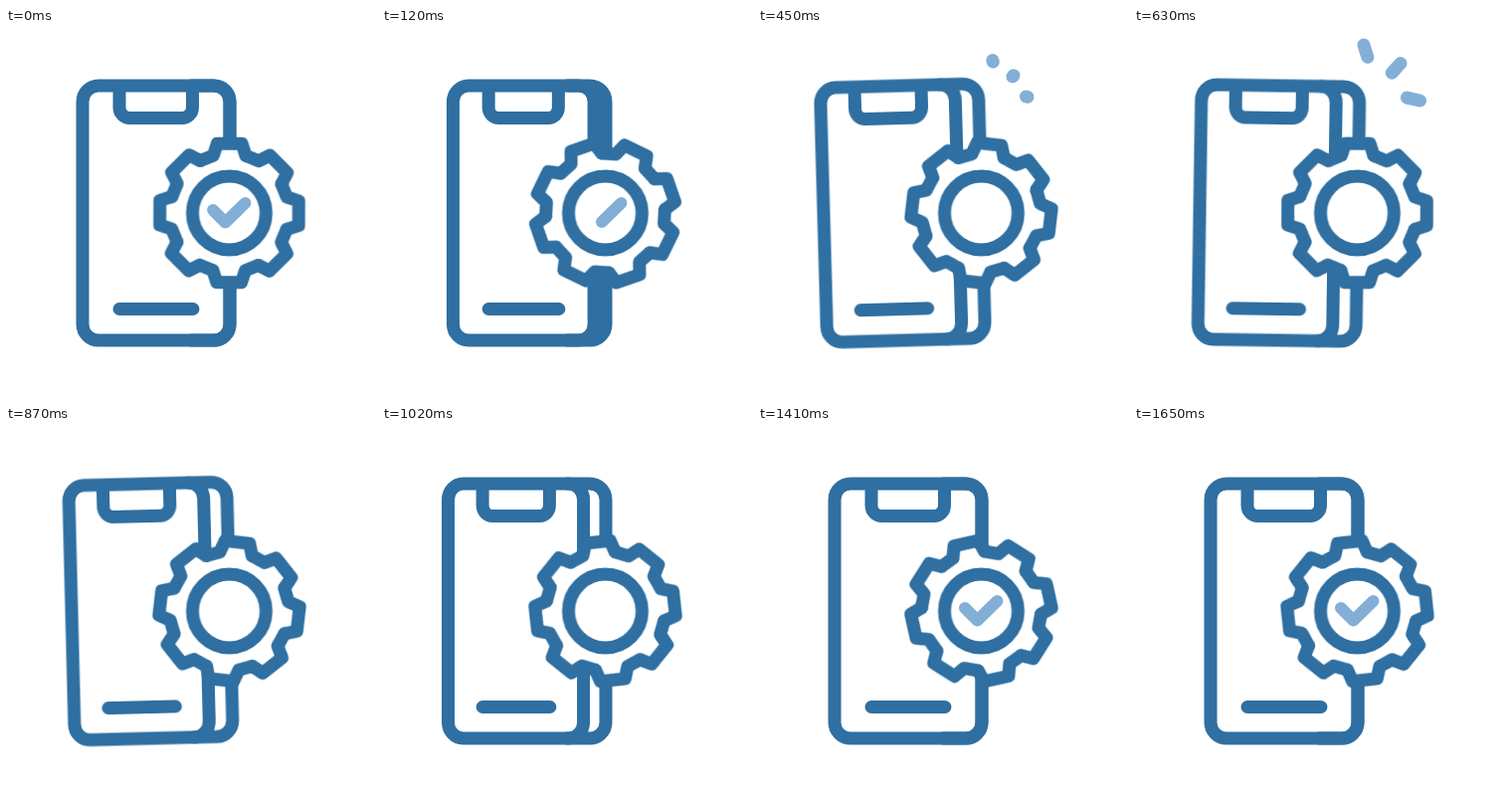
Recreate the animation shown at these times as an HTML page without scripts. Size 372x372 px, loop 1.68 s.

```html
<!DOCTYPE html>
<html lang="en">
<head>
<meta charset="utf-8">
<title>Phone setup complete</title>
<style>
  html, body { margin: 0; width: 100%; height: 100%; overflow: hidden; background: #fff; }
  svg { display: block; width: 100vw; height: 100vh; }

  :root {
    --loop: 1680ms;
    --dark: #2f6fa1;
    --light: #83afd6;
    --flat: path("M93 58H209A16 16 0 0 1 225 74V298A16 16 0 0 1 209 314H93A16 16 0 0 1 77 298V74A16 16 0 0 1 93 58Z M114 58V80A10.5 10.5 0 0 0 124.5 90.5H177A10.5 10.5 0 0 0 187.5 80V58 M114 282.5H188");
    --turned: path("M81 58H186.5A15 16 0 0 1 201.5 74V298A15 16 0 0 1 186.5 314H81A15 16 0 0 1 66 298V74A15 16 0 0 1 81 58Z M100.5 58V80A10 10.5 0 0 0 110.5 90.5H157.5A10 10.5 0 0 0 167.5 80V58 M100.5 282.5H168");
  }

  .dark, .light { fill: none; stroke-width: 13; stroke-linecap: round; stroke-linejoin: round; }
  .dark { stroke: var(--dark); }
  .light { stroke: var(--light); stroke-dasharray: 1 2; }

  .phone { transform-origin: 146px 186px; animation: shake var(--loop) ease-in-out infinite; }
  .face { d: var(--flat); animation: turn var(--loop) ease-in-out infinite; }
  .gear { fill: #fff; animation: spin var(--loop) linear infinite; }
  .check { stroke-width: 12; animation: check var(--loop) linear infinite; }
  .rays { animation: burst var(--loop) linear infinite; }

  @keyframes spin { to { transform: rotate(360deg); } }

  @keyframes turn {
    0%, 71.4%, 100% { d: var(--flat); }
    14.3%, 58.9% { d: var(--turned); }
  }

  @keyframes shake {
    0%, 18.51%, 55.65%, 100% { transform: rotate(0deg); }
    20.83%, 30.12%, 39.4%, 48.69% { transform: rotate(2.5deg); }
    25.48%, 34.76%, 44.05%, 53.33% { transform: rotate(-2.5deg); }
  }

  /* Strokes leave at their far end and return from their start. */
  @keyframes check {
    0% { stroke-dashoffset: 0; opacity: 1; }
    17.86% { stroke-dashoffset: -1; opacity: 1; }
    17.87%, 71.42% { stroke-dashoffset: 1; opacity: 0; }
    71.43% { stroke-dashoffset: 1; opacity: 1; }
    82.7%, 100% { stroke-dashoffset: 0; opacity: 1; }
  }

  @keyframes burst {
    0%, 26.18% { stroke-dashoffset: 1; opacity: 0; }
    26.19% { stroke-dashoffset: 1; opacity: 1; }
    33.93%, 35.12% { stroke-dashoffset: 0; opacity: 1; }
    44.05% { stroke-dashoffset: -1; opacity: 1; }
    44.06%, 100% { stroke-dashoffset: -1; opacity: 0; }
  }
</style>
</head>
<body>
<svg viewBox="0 0 372 372">
  <defs>
    <path id="tooth" d="M-29.3 -52.4L-16.3 -57.8L-12.4 -69.8H12.4L16.3 -57.8"/>
  </defs>

  <g class="phone dark">
    <path d="M186 58H209A16 16 0 0 1 225 74V298A16 16 0 0 1 209 314H186"/>
    <path class="face"/>
  </g>

  <g transform="translate(224.5 186)">
    <g class="dark gear">
      <circle r="58" stroke="none"/>
      <use href="#tooth"/>
      <use href="#tooth" transform="rotate(45)"/>
      <use href="#tooth" transform="rotate(90)"/>
      <use href="#tooth" transform="rotate(135)"/>
      <use href="#tooth" transform="rotate(180)"/>
      <use href="#tooth" transform="rotate(225)"/>
      <use href="#tooth" transform="rotate(270)"/>
      <use href="#tooth" transform="rotate(315)"/>
    </g>
    <circle class="dark" r="37"/>
  </g>

  <path class="light check" pathLength="1" d="M208 183L220.5 195.5L240.5 176"/>

  <g class="light rays">
    <path pathLength="1" d="M236.3 34L231 17"/>
    <path pathLength="1" d="M256 48.8L268 35.5"/>
    <path pathLength="1" d="M269.5 69L287.5 73"/>
  </g>
</svg>
</body>
</html>
```
